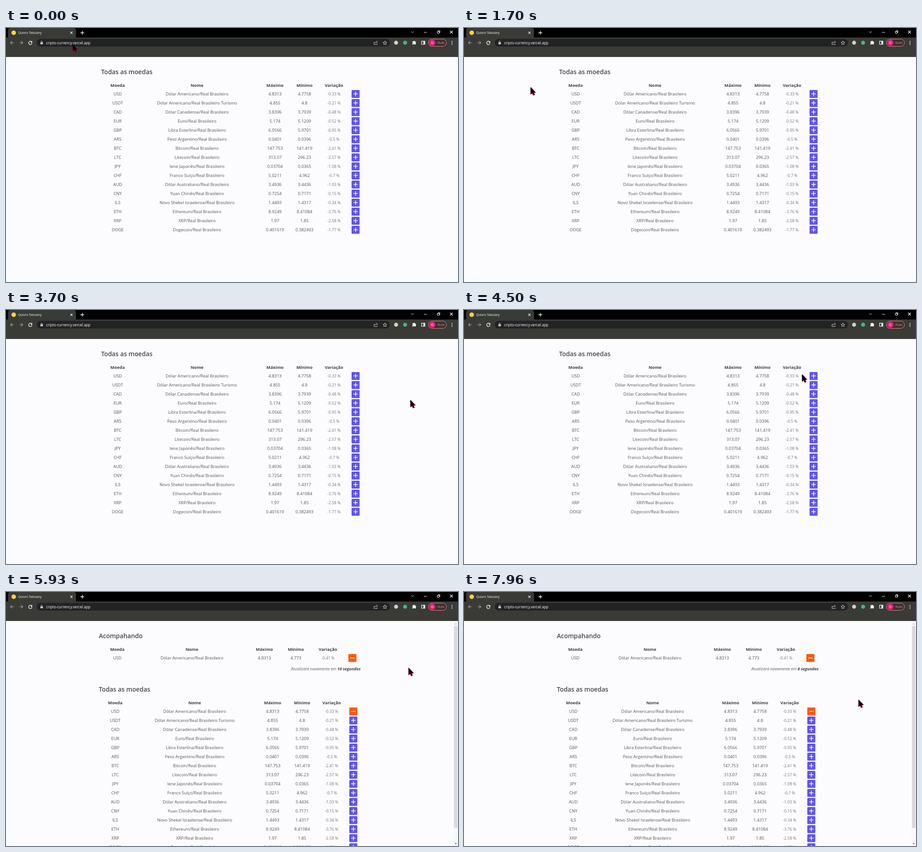
An HTML page with a canvas for the animation above (8000 ms loop, 998x561 px).

```html
<!DOCTYPE html>
<html lang="pt-BR">
<head>
<meta charset="utf-8">
<title>Quivro Tabulary</title>
<style>
  html, body { margin: 0; width: 100%; height: 100%; overflow: hidden; background: #fcfcfe; }
  canvas { display: block; width: 100vw; height: 100vh; }
</style>
</head>
<body>
<canvas id="stage" width="998" height="561"></canvas>
<script>
const ctx = document.getElementById('stage').getContext('2d');
const LOOP = 8000;
const ADDED_AT = 5360;
const FAMILY = '"Open Sans", "Noto Sans", sans-serif';
const INK = '#47474c', PURPLE = '#6054ea', ORANGE = '#fd5a08', BAR = '#3a3a37';

const COINS = `USD|Dólar Americano|4.8313|4.7758|-0.33
USDT|Dólar Americano|4.855|4.8|-0.21
CAD|Dólar Canadense|3.8396|3.7939|-0.48
EUR|Euro|5.174|5.1209|-0.52
GBP|Libra Esterlina|6.0566|5.9701|-0.95
ARS|Peso Argentino|0.0401|0.0396|-0.5
BTC|Bitcoin|147.753|141.419|-2.41
LTC|Litecoin|313.07|296.23|-2.57
JPY|Iene Japonês|0.03704|0.0365|-1.08
CHF|Franco Suíço|5.0211|4.962|-0.7
AUD|Dólar Australiano|3.4936|3.4436|-1.03
CNY|Yuan Chinês|0.7254|0.7171|-0.15
ILS|Novo Shekel Israelense|1.4493|1.4317|-0.34
ETH|Ethereum|8.9249|8.41084|-3.76
XRP|XRP|1.97|1.85|-2.58
DOGE|Dogecoin|0.401619|0.382493|-1.77`.split('\n').map(line => {
  const [code, name, max, min, change] = line.split('|');
  const suffix = code === 'USDT' ? ' Turismo' : '';
  return [code, `${name}/Real Brasileiro${suffix}`, max, min, `${change} %`];
});
const TRACKED = ['USD', COINS[0][1], '4.8313', '4.773', '-0.41 %'];
const HEADERS = ['Moeda', 'Nome', 'Máximo', 'Mínimo', 'Variação'];
const LIST_COLS = [246.5, 421.8, 594, 659, 724.2, 772];
const TRACKED_COLS = [245.8, 410.5, 570.5, 640, 710.8, 764.6];

// Pointer keys: time, x, y
const PATH = [
  [0, 147, 36], [300, 147, 37], [1300, 147, 131], [1700, 147, 131],
  [2100, 560, 160], [2500, 970, 192], [2560, 981, 195], [2760, 986, 197],
  [3330, 935, 199], [3700, 893, 199], [4200, 817, 148], [4430, 740, 142],
  [4700, 777, 144], [5500, 777, 144], [5900, 880, 165], [6200, 957, 205],
  [6450, 915, 238], [6660, 884, 242], [6950, 884, 242], [7700, 871, 238], [8000, 871, 238]
];

function text(str, x, y, size, color = INK, align = 'left', style = '400') {
  ctx.font = `${style} ${size}px ${FAMILY}`;
  ctx.fillStyle = color;
  ctx.textAlign = align;
  ctx.fillText(str, x, y);
}

function rect(x, y, w, h, color, radius = 0) {
  ctx.fillStyle = color;
  ctx.beginPath();
  ctx.roundRect(x, y, w, h, radius);
  ctx.fill();
}

function disc(x, y, r, color) {
  ctx.fillStyle = color;
  ctx.beginPath();
  ctx.arc(x, y, r, 0, Math.PI * 2);
  ctx.fill();
}

function line(d, color = '#fff', width = 1.1, x = 0, y = 0) {
  ctx.save();
  ctx.translate(x, y);
  ctx.strokeStyle = color;
  ctx.lineWidth = width;
  ctx.stroke(new Path2D(d));
  ctx.restore();
}

function shape(d, color, x, y) {
  ctx.save();
  ctx.translate(x, y);
  ctx.fillStyle = color;
  ctx.fill(new Path2D(d));
  ctx.restore();
}

function drawBrowser() {
  rect(0, 0, 998, 21, '#000');
  rect(0, 21, 998, 43, BAR);
  rect(4.5, 0, 150, 24, BAR, [5, 5, 0, 0]);
  disc(17, 10.5, 5, '#f8d33a');
  text('Quivro Tabulary', 27, 13.2, 7, '#fff', 'left', '500');
  line('M-2.3-2.3L2.3 2.3M2.3-2.3L-2.3 2.3', '#fff', 1.1, 144.5, 10.5);
  line('M-4 0H4M0-4V4', '#fff', 1.3, 168.5, 10.5);

  line('M-3-1.5L0 1.5L3-1.5', '#ddd', 1, 897.5, 9);
  line('M-3 0H3', '#fff', 1, 926, 9.5);
  line('M-2.5-1.5H1.5V2.5H-2.5ZM-1-1.5V-3H3V1H1.5', '#fff', 1, 955, 9);
  line('M-3-3L3 3M3-3L-3 3', '#fff', 1.1, 983.5, 9);

  line('M4 0H-3.5M0-3.7L-3.7 0L0 3.7', '#a5a5a3', 1.1, 13.5, 32.5);
  line('M-4 0H3.5M0-3.7L3.7 0L0 3.7', '#a5a5a3', 1.1, 33.5, 32.5);
  line('M3.2-1.8A3.7 3.7 0 1 0 3.7 1', '#fff', 1.3, 53.7, 32.7);
  shape('M4.2-4.2V-.3H.3Z', '#fff', 53.7, 32.7);

  rect(68, 24, 780, 17, '#222325', 8.5);
  rect(76, 31.5, 5.5, 4.5, '#c8c8c8', 0.6);
  line('M-1.5 2V0A1.5 1.5 0 0 1 1.5 0V2', '#c8c8c8', 0.9, 78.75, 30.2);
  text('cripto-currency.vercel.app', 88.5, 35.7, 8.1, '#fff', 'left', '500');

  line('M-2-1H-4V4H3V2M-2 1.5Q-1.5-1.7 2-1.7M1.2-4L4-1.7L1.2.7', '#d0d0d0', 0.9, 816.5, 32.5);
  line('M0-4.2L1.2-1.3L4.2-1.1L1.9.9L2.6 3.8L0 2.2L-2.6 3.8L-1.9.9L-4.2-1.1L-1.2-1.3Z', '#e4e4e4', 0.9, 836.7, 32.8);
  disc(861.3, 32.5, 4.4, '#d0d0ca');
  disc(881.2, 32.5, 4.4, '#41b883');
  shape('M-4-2.8H-1.7A1.5 1.5 0 0 1 1.2-2.8H3.2V-.6A1.5 1.5 0 0 1 3.2 2.2V4.4H1A1.4 1.4 0 0 0-1.8 4.4H-4V2A1.4 1.4 0 0 0-4-.7Z', '#fff', 901.3, 32.2);
  line('M-3.6-3.4H3.6V3.4H-3.6Z', '#fff', 1.2, 921.2, 32.6);
  rect(921.7, 29.2, 3.4, 6.8, '#fff');

  rect(932.5, 24.5, 40, 16, '#3b3031', 8);
  ctx.strokeStyle = '#e58a86';
  ctx.lineWidth = 1;
  ctx.stroke();
  disc(941.3, 32.5, 6.8, '#ec2082');
  text('G', 941.3, 35.2, 7, '#fff', 'center');
  text('Nulo', 952.6, 35.2, 7, '#ee938d');
  for (const y of [29.5, 32.8, 36.1]) disc(984.7, y, 1, '#fff');
}

function drawButton(x, y, active) {
  const left = Math.round(x - 8.9), top = Math.round(y - 8.7);
  rect(left, top, 17.7, 17.6, active ? ORANGE : PURPLE, 1.5);
  line(active ? 'M-4.8 0H4.8' : 'M-4.8 0H4.8M0-4.8V4.8', '#fff', 1.5, left + 8.9, top + 8.6);
}

function drawTable(title, left, top, cols, rows, active) {
  text(title, left, top + 102, 13.8, INK, 'left', '600');
  HEADERS.forEach((h, i) => text(h, cols[i], top + 130.4, 9.4, '#3f3f45', 'center', '700'));
  rows.forEach((row, r) => {
    const y = top + 146 + r * 20;
    row.forEach((cell, c) => {
      const small = c === 4;
      text(cell, cols[c], y + 3.4, small ? 8.65 : 9.35, small ? '#77777c' : '#55555a', 'center');
    });
    drawButton(cols[5], y - 0.2, active && r === 0);
  });
}

function drawScrollbar() {
  rect(988, 64, 10, 497, '#f8f8f9');
  rect(989, 75, 8, 446, '#dbdbdd');
  shape('M-2.3 1.2L0-1.2L2.3 1.2Z', '#b0b0b0', 993, 70.3);
  shape('M-2.3-1.2L0 1.2L2.3-1.2Z', '#55555a', 993, 556);
}

function drawCountdown(t) {
  const count = `${10 - Math.floor((t - ADDED_AT) / 1000)} segundos`;
  text(count, 783, 172.7, 8.9, '#3f3f45', 'right', 'italic 700');
  const width = ctx.measureText(count).width;
  text('Atualizará novamente em ', 783 - width, 172.7, 8.9, '#5c5c61', 'right', 'italic 400');
}

function drawPage(t) {
  rect(0, 64, 998, 497, '#fcfcfe');
  if (t < ADDED_AT) {
    drawTable('Todas as moedas', 210, 0, LIST_COLS, COINS, false);
    return;
  }
  drawTable('Acompahando', 205, 0, TRACKED_COLS, [TRACKED], true);
  drawCountdown(t);
  drawTable('Todas as moedas', 205, 117.5, LIST_COLS.map(x => x - 5.3), COINS, true);
  drawScrollbar();
}

// Monotone cubic through the keys, so holds and turns stay clean.
function pathAt(t, axis) {
  const slope = i => i < 0 || i >= PATH.length - 1 ? 0
    : (PATH[i + 1][axis] - PATH[i][axis]) / (PATH[i + 1][0] - PATH[i][0]);
  const tangent = i => {
    const a = slope(i - 1), b = slope(i);
    return a * b <= 0 ? 0 : 2 * a * b / (a + b);
  };
  let i = 0;
  while (i < PATH.length - 2 && t >= PATH[i + 1][0]) i++;
  const span = PATH[i + 1][0] - PATH[i][0];
  const u = (t - PATH[i][0]) / span, v = 1 - u;
  return (1 + 2 * u) * v * v * PATH[i][axis] + u * v * v * span * tangent(i)
    + u * u * (3 - 2 * u) * PATH[i + 1][axis] - u * u * v * span * tangent(i + 1);
}

function drawPointer(t) {
  const x = pathAt(t, 1), y = pathAt(t, 2);
  const overButton = t > 4200 && t < 5540 && Math.abs(x - 772) < 9 && Math.abs(y - 145.5) < 9;
  ctx.save();
  ctx.translate(x, y);
  ctx.scale(1.08, 1.08);
  ctx.lineJoin = 'round';
  const edge = ctx.createLinearGradient(0, 0, 5, 16);
  const body = new Path2D(overButton
    ? 'M-2.8 0Q-1.6-1-.6 0L.8 4.3L4.6 5Q6 5.5 5.9 7.5L5.3 11.5Q4.5 14 1.8 14Q-.8 14-1.8 11.5L-3.8 8Q-4-.2-3 6.2L-1.4 7.6Z'
    : 'M.5 .7V13.8L3.5 11.2L5.7 16L8 15L5.9 10.4H9.7Z');
  if (overButton) {
    edge.addColorStop(0, '#222');
    edge.addColorStop(0.55, '#4a2046');
    edge.addColorStop(1, '#f020c8');
  } else {
    edge.addColorStop(0, '#30000f');
    edge.addColorStop(1, '#c00848');
  }
  ctx.strokeStyle = edge;
  ctx.lineWidth = 1.6;
  ctx.fillStyle = overButton ? '#5c585e' : '#08000a';
  ctx.stroke(body);
  ctx.fill(body);
  ctx.restore();
}

function frame() {
  const t = performance.now() % LOOP;
  drawPage(t);
  drawBrowser();
  drawPointer(t);
  requestAnimationFrame(frame);
}
frame();
</script>
</body>
</html>
```
